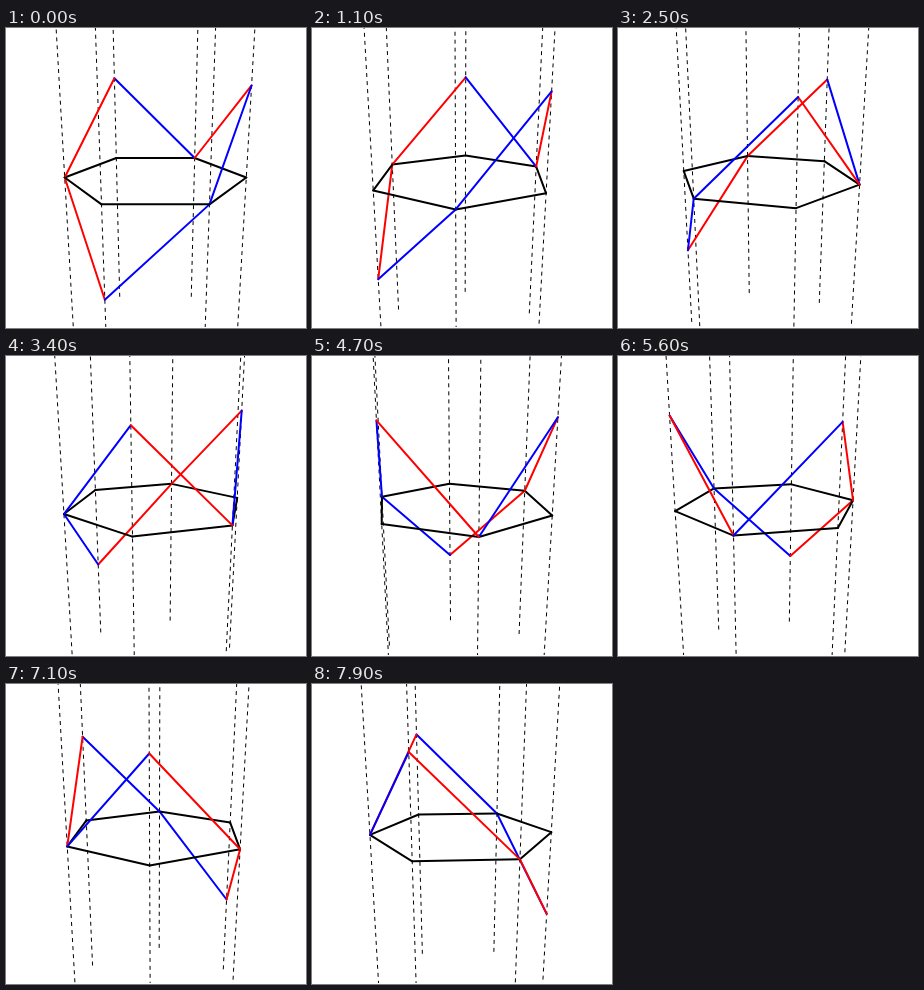
An HTML page with a canvas for the animation above (8000 ms loop, 300 by 300 pixels).

```html
<!DOCTYPE html>
<html lang="en">
<head>
<meta charset="utf-8">
<title>Rotating skew hexagon</title>
<style>
  html, body { margin: 0; width: 100%; height: 100%; overflow: hidden; background: #fff; }
  canvas { display: block; }
</style>
</head>
<body>
<canvas id="stage" width="300" height="300"></canvas>
<script>
const ctx = document.getElementById('stage').getContext('2d');
const STEP = 100, STEPS = 80, TURN = -3;
const SIZE = 299, CENTER = SIZE / 2, FOCAL = 474;

// Camera at (0, -5, 1.5), looking at the origin.
const DIST = Math.hypot(5, 1.5);
const SIN = 1.5 / DIST, COS = 5 / DIST;

// Heights of the skew hexagon's corners at 0, 60, ... 300 degrees.
const HEIGHTS = [1, 0, 1, 0, -1, 0];
const EDGE_COLORS = ['#f00', '#00f', '#f00', '#f00', '#00f', '#00f'];

// The drawing is one pixel smaller than the stage.
ctx.rect(0, 0, SIZE, SIZE);
ctx.clip();

function project(corner, z, turn) {
  const a = (corner * 60 + turn) * Math.PI / 180;
  const y = Math.sin(a);
  const depth = DIST + y * COS - z * SIN;
  const k = FOCAL / depth;
  return {
    x: CENTER + Math.cos(a) * k,
    y: CENTER - (z * COS + y * SIN) * k,
    depth
  };
}

function line(p, q, color, width) {
  ctx.strokeStyle = color;
  ctx.lineWidth = width;
  ctx.beginPath();
  ctx.moveTo(p.x, p.y);
  ctx.lineTo(q.x, q.y);
  ctx.stroke();
}

// Dashes are fitted so that both ends of the rod fall on a dash.
function rod(corner, turn) {
  const p = project(corner, -2, turn), q = project(corner, 2, turn);
  const len = Math.hypot(q.x - p.x, q.y - p.y);
  const dash = (len + 4) / Math.round((len + 4) / 8) / 2;
  ctx.setLineDash([dash, dash]);
  line(p, q, '#000', 1);
}

function draw(turn) {
  ctx.fillStyle = '#fff';
  ctx.fillRect(0, 0, SIZE, SIZE);
  ctx.lineCap = 'butt';
  for (let i = 0; i < 6; i++) rod(i, turn);

  ctx.setLineDash([]);
  ctx.lineCap = 'round';
  const edges = [];
  for (let i = 0; i < 6; i++) {
    const j = (i + 1) % 6;
    edges.push([project(i, 0, turn), project(j, 0, turn), '#000']);
    edges.push([project(i, HEIGHTS[i], turn), project(j, HEIGHTS[j], turn), EDGE_COLORS[i]]);
  }
  edges.sort((a, b) => b[0].depth + b[1].depth - a[0].depth - a[1].depth);
  for (const [p, q, color] of edges) line(p, q, color, 2);
}

const start = performance.now();
function tick() {
  const step = Math.floor((performance.now() - start) / STEP) % STEPS;
  draw(step * TURN);
  requestAnimationFrame(tick);
}
tick();
</script>
</body>
</html>
```
